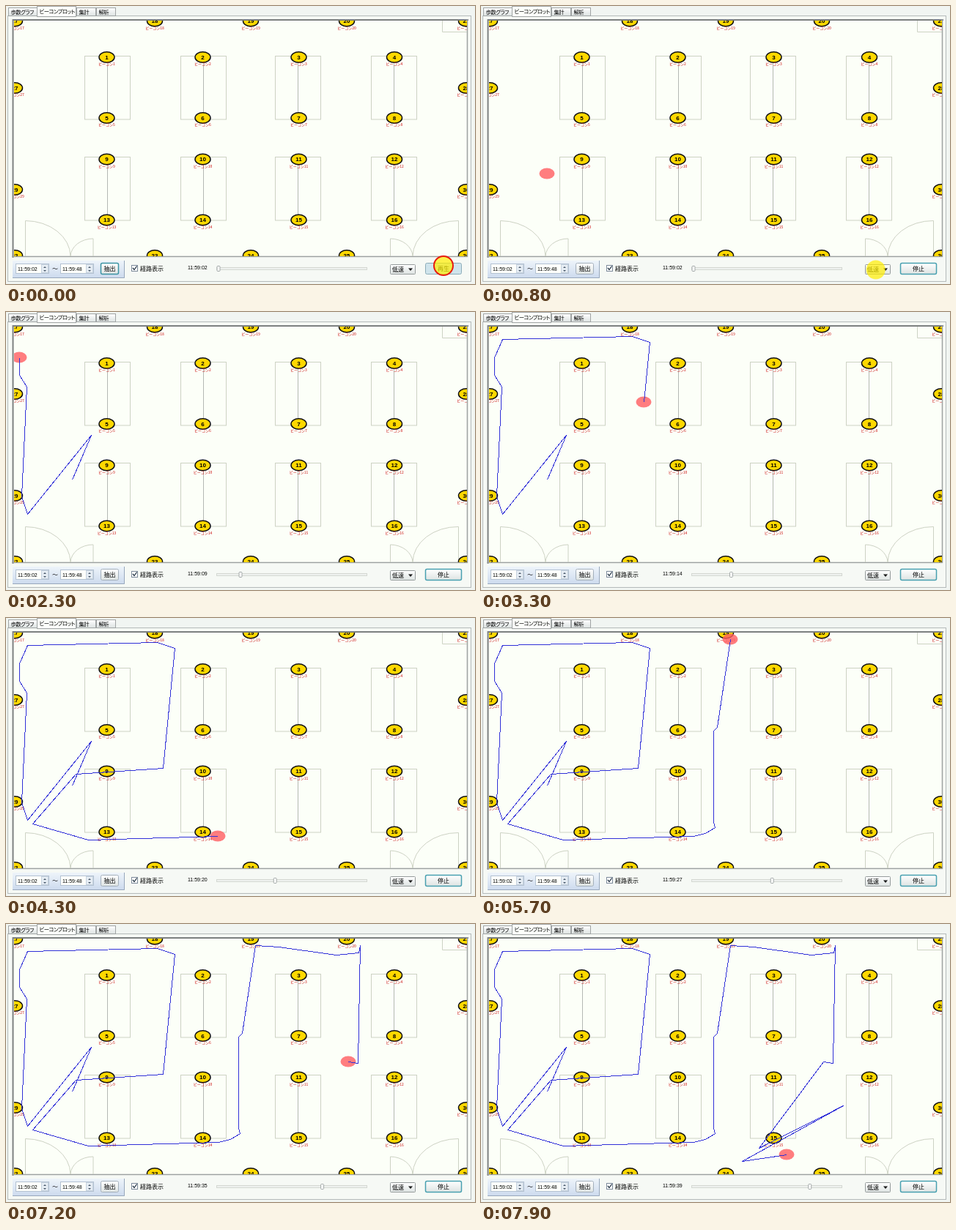
Write an HTML page that moves like this. It is 640 px wide and 380 px high and loops after 8000 ms.

```html
<!DOCTYPE html>
<html lang="ja">
<head>
<meta charset="utf-8">
<style>
html, body { margin: 0; width: 100%; height: 100%; overflow: hidden; background: #f1f5f2; }
svg { display: block; width: 640px; height: 380px; }
text { font: 7px "Liberation Sans", "Noto Sans CJK JP", sans-serif; fill: #000; }
.ja { font: 8px "Noto Sans CJK JP", sans-serif; }
.tab { font: 7.4px "Noto Sans CJK JP", sans-serif; font-feature-settings: "palt"; letter-spacing: -.55px; }
.num { font: bold 8px "Liberation Sans", sans-serif; text-anchor: middle; }
.label { font: 500 5px "Noto Sans CJK JP", sans-serif; fill: #cc1010; text-anchor: middle; }
.mid { text-anchor: middle; }
.plan { fill: none; stroke: #cdd2c4; }
</style>
</head>
<body>
<svg viewBox="0 0 640 380">
  <defs>
    <clipPath id="room"><rect x="11" y="20" width="618" height="322"/></clipPath>
    <linearGradient id="face" x2="0" y2="1">
      <stop stop-color="#fff"/><stop offset="1" stop-color="#dde3e2"/>
    </linearGradient>
    <linearGradient id="group" x2="0" y2="1">
      <stop stop-color="#eef4fa"/><stop offset="1" stop-color="#ccdaee"/>
    </linearGradient>
  </defs>
  <g id="form"></g>
  <g clip-path="url(#room)">
    <g id="floor"></g>
    <ellipse id="marker" rx="10.5" ry="7.5" fill="#ff5c60" opacity=".8"/>
    <polyline id="trail" fill="none" stroke="#3030d8" shape-rendering="crispEdges" transform="translate(.5 .5)"/>
  </g>
  <g id="controls"></g>
  <circle id="spot" r="13" fill="#ffee00" opacity=".7"/>
  <circle id="ring" cx="597" cy="355" r="13" fill="none" stroke="#e81c10" stroke-width="2"/>
</svg>
<script>
const $ = id => document.getElementById(id);
const rect = (x, y, w, h, fill, stroke = 'none', extra = '') =>
  `<rect x="${x}" y="${y}" width="${w}" height="${h}" fill="${fill}" stroke="${stroke}" ${extra}/>`;
const text = (x, y, s, cls = '', id = '') => `<text x="${x}" y="${y}" class="${cls}" id="${id}">${s}</text>`;
const path = (d, stroke, extra = '') => `<path d="${d}" fill="none" stroke="${stroke}" ${extra}/>`;

// Window, tabs and room border
const tab = (x, w, s, active) =>
  rect(x + .5, active ? .5 : 2.5, w, active ? 14 : 11, active ? '#fdfffb' : 'url(#face)', '#a0a4a4') +
  text(x + 3.5, active ? 10 : 11, s, 'tab');
$('form').innerHTML =
  rect(2.5, 13.5, 632, 363, '#f6f9f5', '#b4baba') +
  tab(3, 39, '歩数グラフ') + tab(96, 26, '集計') + tab(123, 26, '解析') + tab(42, 53, 'ビーコンプロット', true) +
  rect(8, 18, 623, 326, '#fcfff8') +
  path('M9.5 344V19H631', '#7c8080', 'stroke-width="2"') +
  path('M8 342.5H629.5V18', '#9ca0a0', 'stroke-width="1.5"');

// Floor plan and beacons
const cols = [137.5, 268.5, 399.5, 530], rows = [70, 153, 209.5, 292.5];
const beacon = (x, y, n) =>
  `<ellipse cx="${x}" cy="${y}" rx="10.5" ry="7.3" fill="#ffd800" stroke="#111" stroke-width="1.5"/>` +
  text(x, y + 2.7, n, 'num') + text(x, y + 11, 'ビーコン' + n, 'label');
let plan = '';
for (const x of [107.5, 238.5, 367.5, 498.5])
  for (const y of [68.5, 206.5])
    plan += rect(x, y, 62, 86.5, 'none', '', 'class="plan"') + path(`M${x + 31} ${y}v86`, '#b4b8b4');
plan += `<path class="plan" d="M595.5 19V35.5H630M26.5 342V293.5A62 49 0 0 1 88 342A31 25 0 0 1 119 318V342
  M617.5 342V293.5A62 49 0 0 0 555 342A31 25 0 0 0 524.5 318V342"/>`;
rows.forEach((y, r) => cols.forEach((x, c) => plan += beacon(x, y, r * 4 + c + 1)));
[12, 203, 334, 465, 628].forEach((x, i) => plan += beacon(x, 20.5, 17 + i) + beacon(x, 341, 22 + i));
[112, 251].forEach((y, i) => plan += beacon(12, y, 27 + 2 * i) + beacon(628, y, 28 + 2 * i));
$('floor').innerHTML = plan;

// Bottom bar
const spinner = (x, s) =>
  rect(x + .5, 352.5, 45, 13, '#fdfffb', '#b4c2d2') + text(x + 3, 362, s) +
  rect(x + 35.5, 353.5, 9, 11, '#e6edf4', '#c6d2de') +
  `<path d="M${x + 38} 358l2-2 2 2zM${x + 38} 361l2 2 2-2z" fill="#456"/>`;
const button = (x, w, s, id) =>
  rect(x + .5, 351.5, w, 15, 'url(#face)', '#8a9a9a', `rx="2" id="${id}"`) + text(x + w / 2 + .5, 362, s, 'ja mid', id + 'Text');
$('controls').innerHTML =
  rect(9, 348, 153, 24, 'url(#group)') + path('M9 371.5H161.5V348', '#98a8bc') +
  spinner(13, '11:59:02') + text(67, 362, '～', 'ja mid') + spinner(74, '11:59:48') +
  button(129, 24, '抽出', 'extract') +
  rect(171.5, 354.5, 8, 8, '#fff', '#7c8a9a') + path('M173 358l2 2.5 3.5-5', '#234', 'stroke-width="1.3"') +
  text(183, 361.5, '経路表示', 'ja') + text(248, 360, '', '', 'clock') +
  rect(287.5, 357.5, 205, 3, '#eef1ee', '#d4d8d2') +
  rect(-2, 355.5, 4, 7, '#fcfdfb', '#a4aaaa', 'id="thumb" rx="1"') +
  rect(524.5, 353.5, 34, 13, 'url(#face)', '#969c9c', 'rx="1"') + text(527, 363, '低速', 'ja') +
  '<path d="M549 358.5h6l-3 3.5z" fill="#111"/>' +
  button(572, 49, '再生', 'play');

const track = [[90, 229], [116, 168], [29, 276], [21, 252], [24.5, 177], [28, 102], [18, 86], [18, 62],
  [29, 37], [117, 35], [206, 33], [230, 41], [222, 123], [214, 205], [95, 213], [36, 281], [112, 303],
  [200, 300.5], [289, 298], [306, 294], [319, 286], [317, 279], [317, 216], [317, 154], [322, 149], [340, 29],
  [356, 30], [372, 31], [411, 36.5], [450, 42], [481, 39], [483, 29], [480, 190], [467, 188],
  [379, 306], [494, 248], [356, 324], [417, 315]];

const show = (id, on) => $(id).setAttribute('visibility', on ? 'visible' : 'hidden');
const set = (id, attrs) => { for (const k in attrs) $(id).setAttribute(k, attrs[k]); };

function draw(t) {
  const step = Math.max(0, Math.min(track.length - 1, Math.floor(2.2 + (t - 1300) * .0053)));
  const [x, y] = track[step];
  const playing = t >= 400;
  set('marker', { cx: x, cy: y });
  set('trail', { points: track.slice(0, step + 1).join(' ') });
  show('marker', t >= 800);
  show('trail', t >= 800);
  $('clock').textContent = '11:59:' + String(step + 2).padStart(2, '0');
  set('thumb', { x: 288 + step * 4.29 });

  $('playText').textContent = playing ? '停止' : '再生';
  set('play', { stroke: playing ? '#48a0b0' : '#8cacb8', fill: playing ? 'url(#face)' : '#cfe4ec', 'stroke-width': playing ? 1.5 : 1 });
  set('extract', { stroke: playing ? '#a4b0bc' : '#3c94a4', 'stroke-width': playing ? 1 : 1.5 });

  // Pointer highlight leaves through the bottom edge
  const move = Math.max(0, (t - 700) / 600);
  set('spot', { cx: 597 - 346 * Math.min(1, move), cy: 355 + 33 * move });
  show('spot', t < 1600);
  show('ring', t < 300);
}

const start = performance.now();
(function tick() {
  draw((performance.now() - start) % 8000);
  requestAnimationFrame(tick);
})();
</script>
</body>
</html>
```
